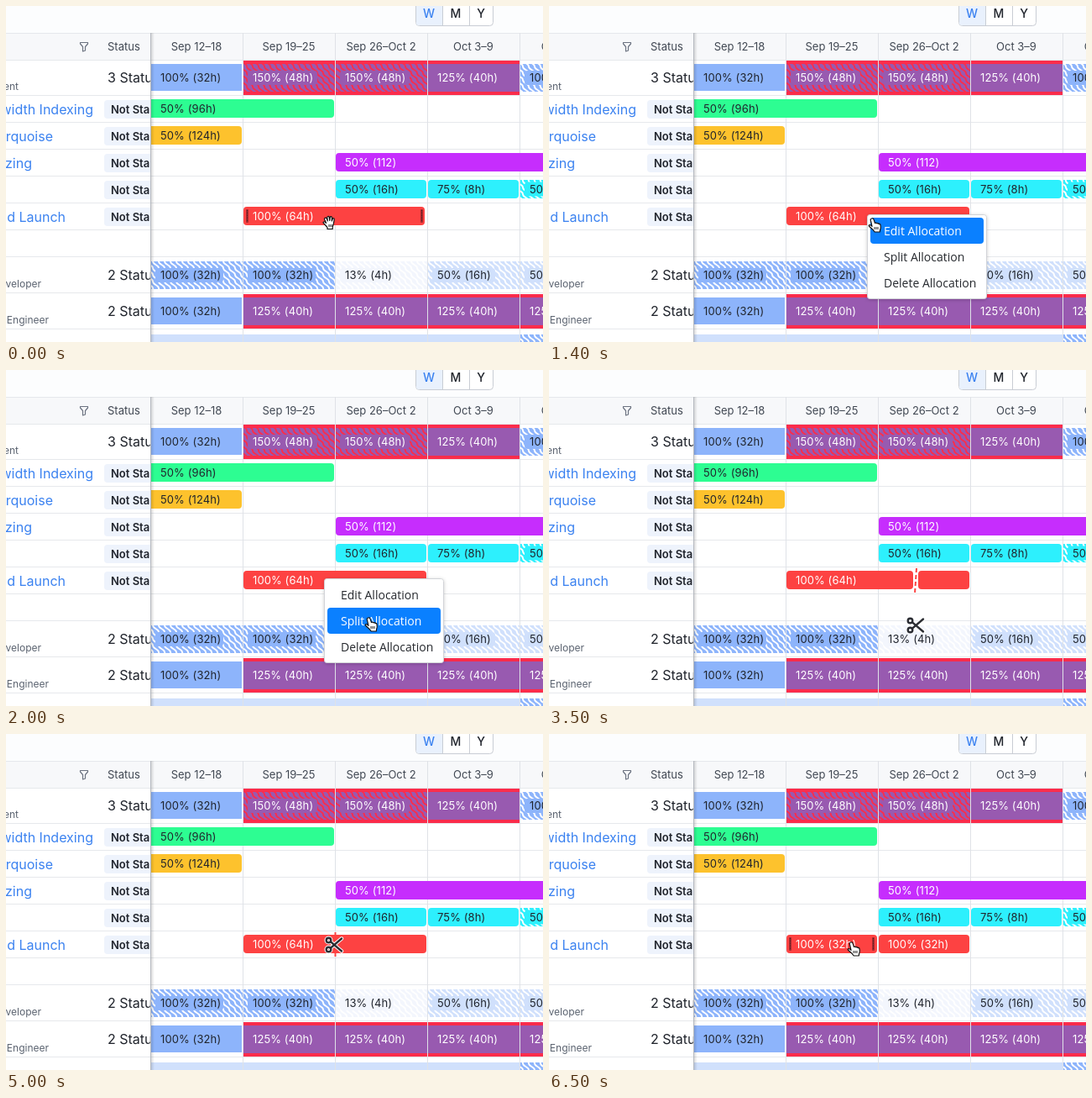
Animation, 640 px wide and 400 px high, one loop 8000 ms. Source, as an HTML page:

```html
<!DOCTYPE html>
<html lang="en">
<head>
<meta charset="utf-8">
<title>Split allocation</title>
<style>
html, body { margin: 0; width: 100%; height: 100%; overflow: hidden; background: #fcfdfe; }
svg { display: block; width: 640px; height: 400px; font: 13px Inter, sans-serif; }
.menu { font: 14px "Open Sans", "Noto Sans", sans-serif; }
.label { letter-spacing: .1px; }
</style>
</head>
<body>
<svg id="stage" viewBox="0 0 640 400"></svg>
<script>
const stage = document.getElementById('stage');
const INK = '#20242c', BLUE = '#8db4fb', PALE = '#d0e0fc', LINK = '#3b82f0',
      RED = '#fb2c4b', PLUM = '#985ab0', BAR = '#fd4242', CYAN = '#2df0fd';
const weeks = [173, 283, 393, 503, 613];

const rect = (x, y, w, h, fill, rx = 0, extra = '') =>
  `<rect x="${x}" y="${y}" width="${w}" height="${h}" rx="${rx}" fill="${fill}" ${extra}/>`;
const text = (x, y, s, fill = INK, extra = '') =>
  `<text x="${x}" y="${y}" fill="${fill}" ${extra}>${s}</text>`;
const path = (d, extra) => `<path d="${d}" ${extra}/>`;
const label = (x, y, s, fill = INK) => text(x, y, s, fill, 'class="label"');
const hline = (y, color = '#e6e8ec') => rect(0, y, 640, 1, color);

const wave = (id, color) =>
  `<pattern id="${id}" width="7" height="8" patternUnits="userSpaceOnUse">
    <path d="M-7 0c0 4 7 4 7 8M0 0c0 4 7 4 7 8M7 0c0 4 7 4 7 8" fill="none" stroke="${color}" stroke-width="1.9"/>
  </pattern>`;

function bar(x, right, y, color, s, fill = INK) {
  return rect(x, y, right - x, 22, color, 4) + label(Math.max(x, 173) + 11, y + 16, s, fill);
}

// Block with wiggly stripes and a solid patch behind its label.
function wavy(x, y, h, color, s, patch, stripe = 'white') {
  const mid = y + h / 2;
  return rect(x, y, 109, h, color) + rect(x, y, 109, h, `url(#${stripe})`) +
    rect(x + 5, mid - 8.5, patch, 17, color, 4) + label(x + 11, mid + 4.5, s);
}

function over(x, y, s, striped) {
  const block = rect(x, y, 109, 41, RED) + rect(x, y + 4, 109, 33, PLUM);
  const stripes = striped
    ? rect(x, y + 4, 109, 33, 'url(#red)') + rect(x + 5, y + 12, 83, 17, PLUM, 4) : '';
  return block + stripes + label(x + 11, y + 25, s, '#fff');
}

function grid() {
  let out = rect(0, 32, 640, 368, '#fff') + rect(0, 32, 640, 33, '#f7f8fa');
  out += [32, 64, 106, 138, 170, 202, 234, 266, 298, 341, 384].map(y => hline(y)).join('');
  out += weeks.slice(1).map(x => rect(x - 1, 32, 1, 368, '#dfe2e7')).join('');
  ['Sep 12–18', 'Sep 19–25', 'Sep 26–Oct 2', 'Oct 3–9', 'Oct 10–16'].forEach((s, i) => {
    out += text(weeks[i] + 54, 53, s, '#414853', 'text-anchor="middle"');
  });
  return out;
}

function toggle() {
  return rect(488.5, -8, 92, 31.5, '#fff', 4, 'stroke="#c9cdd4"') +
    path('M489 0H520V23H492Q489 23 489 20Z', 'fill="#e9f1fd"') +
    path('M520.5 0V23M552.5 0V23', 'stroke="#c9cdd4"') +
    [['W', 504, LINK], ['M', 536, INK], ['Y', 566, INK]].map(([s, x, c]) =>
      text(x, 14, s, c, 'text-anchor="middle" font-size="14" font-weight="500"')).join('');
}

function schedule() {
  let out = rect(173, 69, 108, 32, BLUE) + label(184, 90, '100% (32h)') +
    over(283, 65, '150% (48h)', true) + over(393, 65, '150% (48h)', true) +
    over(503, 65, '125% (40h)') + wavy(613, 69, 33, BLUE, '100% (32h)', 81);
  out += bar(165, 391, 111, '#2dfd92', '50% (96h)') +
    bar(165, 281, 143, '#fdc22d', '50% (124h)') +
    bar(393, 660, 175, '#c62dfd', '50% (112)', '#fff') +
    bar(393, 501, 207, CYAN, '50% (16h)') + bar(503, 611, 207, CYAN, '75% (8h)') +
    wavy(613, 207, 22, CYAN, '50% (16h)', 75);
  out += wavy(173, 304, 33, BLUE, '100% (32h)', 81) + wavy(283, 304, 33, BLUE, '100% (32h)', 81) +
    wavy(393, 304, 33, '#f3f6fd', '13% (4h)', 64) +
    wavy(503, 304, 33, PALE, '50% (16h)', 75) + wavy(613, 304, 33, PALE, '50% (16h)', 75);
  out += rect(173, 347, 108, 32, BLUE) + label(184, 368, '100% (32h)');
  out += weeks.slice(1).map(x => over(x, 343, '125% (40h)')).join('');
  out += weeks.map((x, i) => rect(x, 391, 109, 9, i == 4 ? BLUE : PALE)).join('') +
    rect(613, 391, 109, 9, 'url(#white)');
  return out;
}

function sidebar() {
  let out = rect(0, 33, 172, 31, '#f7f8fa') + rect(0, 65, 172, 335, '#fff') +
    [106, 138, 170, 202, 234, 266, 298, 341, 384].map(y => rect(0, y, 172, 1, '#e6e8ec')).join('');
  out += path('M88.5 43.5H97.5V45L94.5 48.5V53L91.5 54V48.5L88.5 45Z',
    'fill="none" stroke="#6b7280" stroke-width="1.2" stroke-linejoin="round"');
  out += text(121, 53, 'Status', '#414853');
  [[91, 3], [326, 2], [369, 2]].forEach(([y, n]) => out += text(121, y, n + ' Status', INK, 'font-size="16"'));
  [112, 144, 176, 208, 240].forEach(y => {
    out += rect(117, y, 70, 22, '#eef3fc', 4) + text(125, y + 16, 'Not Started', INK, 'font-weight="600"');
  });
  [['width Indexing', 104, 129], ['urquoise', 56, 161], ['zing', 31, 193], ['nd Launch', 71, 257]].forEach(([s, x, y]) =>
    out += text(x, y, s, LINK, 'font-size="16" text-anchor="end"'));
  [['ent', 15, 100], ['veloper', 42, 335], ['Engineer', 51, 378]].forEach(([s, x, y]) =>
    out += text(x, y, s, '#5b6370', 'font-size="12" text-anchor="end"'));
  return `<g clip-path="url(#side)">${out}</g>` +
    rect(172, 32, 1, 368, '#b5b9c0') + rect(173, 32, 4, 368, 'url(#shade)');
}

const redBar = (x, right, s = '') => bar(x, right, 239, BAR, s, '#fff');
const handles = (...xs) => xs.map(x => rect(x, 242, 3, 16, '#a82b30', 1) +
  path(`M${x + 1.5} 243V257`, 'stroke="#4b1c20" stroke-dasharray="1 1"')).join('');

function cursor(x, y, open) {
  const d = open
    ? 'M3 3.5c1-.9 2 0 2.4 1L6.3 7 5.8 2.8c0-1.6 2-1.8 2.4-.3L8.8 6.5 9.2 2.5c.3-1.4 2.2-1.2 2.2.3L11.3 7l.9-2.6c.6-1.2 2.2-.7 2 .7L13.4 10c-.3 2-1 3-1.2 4.2v2.3H6v-1.8C5 13 2.5 11 1.2 9.2c-.5-1.2.8-1.9 1.8-1.1L4.5 9.3 2.6 5C2.4 4.3 2.5 3.8 3 3.5z'
    : 'M4.5 1c1.5-.6 2.3.3 2.7 1.6L8.5 6.5c1-.8 2-.4 2.3.4.9-.6 1.9-.2 2.2.7 1-.4 1.8.1 2 1 .5 2.5.6 4-.4 6l-.3 2.4H8.2C6.5 14 3 12 1.5 10.2c-.7-1.2.6-2 1.8-1.3L5 10.3 3.3 3.2C3 2 3.4 1.3 4.5 1z';
  return `<g transform="translate(${x} ${y})">` +
    path(d, 'fill="#fff" stroke="#111" stroke-width="1.2" stroke-linejoin="round"') +
    path('M8 11v3M10 11v3M12 11v3', 'stroke="#111" stroke-width=".9"') + '</g>';
}

function scissors(x, y) {
  const shape = '<circle cx="-6.5" cy="-5.5" r="2.8"/><circle cx="-6.5" cy="5.5" r="2.8"/>' +
    '<path d="M-4.3-3.8L9 7.5M-4.3 3.8L9-7.5"/>';
  const layer = (color, width) => `<g fill="none" stroke="${color}" stroke-width="${width}" stroke-linecap="round">${shape}</g>`;
  return `<g transform="translate(${x} ${y})">${layer('#fff', 4.4)}${layer('#2b2d33', 2.4)}</g>`;
}

const cut = (x, lean = 0) =>
  path(`M${x + lean} 236L${x - lean} 266`, `stroke="${BAR}" stroke-width="2" stroke-dasharray="5 3"`);

function menu(active) {
  const items = ['Edit', 'Split', 'Delete'].map((s, i) =>
    (i == active ? rect(383, 252 + 31 * i, 135, 31, '#0a80ff', 4) : '') +
    text(399, 273 + 31 * i, s + ' Allocation', i == active ? '#fff' : '#25282d')).join('');
  return rect(379.5, 248.5, 142, 100, '#fff', 3, 'stroke="#d2d4d8" filter="url(#drop)"') +
    `<g class="menu">${items}</g>`;
}

const whole = redBar(283, 501, '100% (64h)');
const scenes = [
  [0, redBar(283, 499, '100% (64h)') + handles(286, 494) + cursor(377, 249, true)],
  [500, whole + menu(0) + cursor(380, 252)],
  [2000, whole + menu(1) + cursor(427, 294)],
  [3500, redBar(283, 434, '100% (64h)') + redBar(440, 501) + cut(437, 1) + scissors(437, 304)],
  [5000, whole + cut(392.5) + scissors(391, 251)],
  [6500, redBar(283, 391, '100% (32h)') + redBar(393, 501, '100% (32h)') + handles(286, 385) + cursor(355, 247)],
];

stage.innerHTML = `<defs>${wave('white', '#fff')}${wave('red', RED)}
  <clipPath id="side"><rect width="172" height="400"/></clipPath>
  <linearGradient id="shade"><stop stop-opacity=".14"/><stop offset="1" stop-opacity="0"/></linearGradient>
  <filter id="drop"><feDropShadow dx="0" dy="1" stdDeviation="2" flood-opacity=".2"/></filter></defs>` +
  rect(0, 0, 640, 400, '#fcfdfe') + toggle() + grid() + schedule() + sidebar() + '<g id="action"></g>';

const action = document.getElementById('action');
let shown;
function draw(now) {
  const t = now % 8000;
  const scene = scenes.findLast(([start]) => t >= start);
  if (scene !== shown) {
    shown = scene;
    action.innerHTML = scene[1];
  }
  requestAnimationFrame(draw);
}
draw(performance.now());
</script>
</body>
</html>
```
